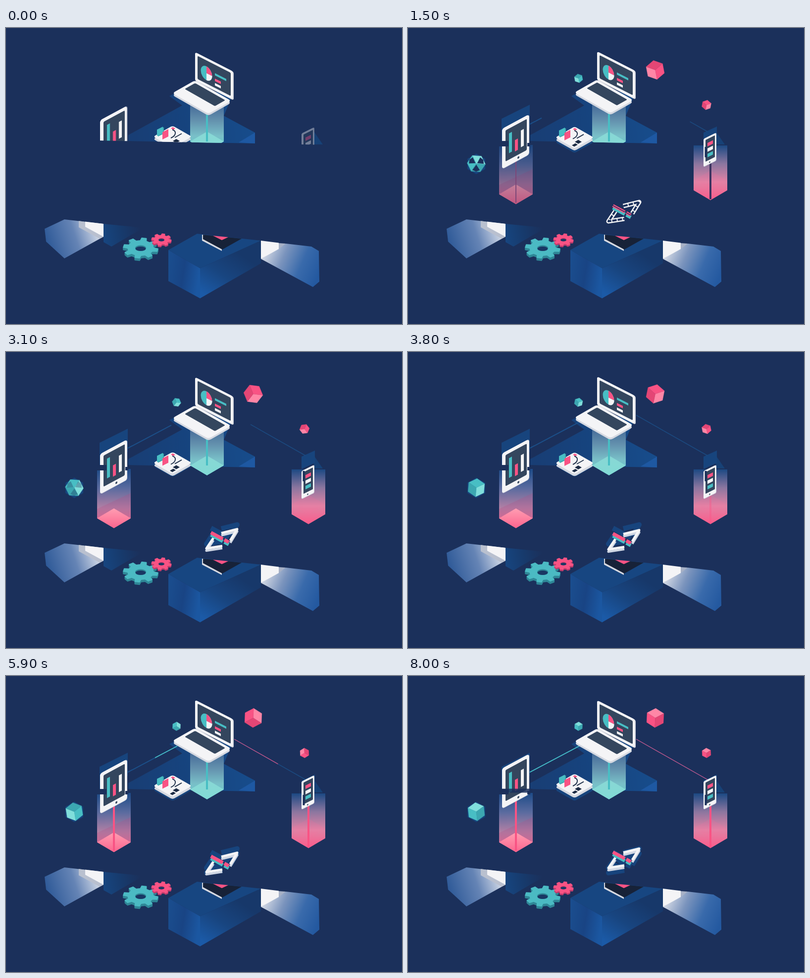
Animation, 800 px wide and 600 px high, one loop 8.1 s. Source, as an HTML page:

```html
<!DOCTYPE html>
<html lang="en">
<head>
<meta charset="utf-8">
<title>Isometric devices</title>
<style>
html, body { margin: 0; width: 100%; height: 100%; overflow: hidden; background: #1b305b; }
svg { display: block; width: 100%; height: 100%; }
</style>
</head>
<body>
<svg id="stage" viewBox="0 0 800 600" xmlns="http://www.w3.org/2000/svg"></svg>
<script>
const LOOP = 8100, STEP = 100;
const BG = '#1b305b', GHOST = '#17447d', WHITE = '#f4f4f6', EDGE = '#d6d9e1', SCREEN = '#34465e';
const PINK = '#f95384', TEAL = '#48bec4';

// markup helpers
const poly = (points, fill, more = '') => `<polygon points="${points}" fill="${fill}" ${more}/>`;
const rect = (x, y, w, h, fill, more = '') =>
  `<rect x="${x}" y="${y}" width="${w}" height="${h}" fill="${fill}" ${more}/>`;
const round = (w, h, r, fill, inset = 0) => rect(inset, inset, w, h, fill, `rx="${r}"`);
const ellipse = (x, y, rx, ry, fill) => `<ellipse cx="${x}" cy="${y}" rx="${rx}" ry="${ry}" fill="${fill}"/>`;
const path = (d, color, width, more = '') =>
  `<path d="${d}" fill="none" stroke="${color}" stroke-width="${width}" stroke-linejoin="round" ${more}/>`;
const group = (id, body, more = '') => `<g id="${id}" ${more}>${body}</g>`;
const fade = (id, x1, y1, x2, y2, ...colors) =>
  `<linearGradient id="${id}" gradientUnits="userSpaceOnUse" x1="${x1}" y1="${y1}" x2="${x2}" y2="${y2}">` +
  colors.map((c, i) => `<stop offset="${i / (colors.length - 1)}" stop-color="${c}"/>`).join('') +
  '</linearGradient>';

// isometric planes: an upright wall with a slope, and the ground
const wall = (x, y, slope, body) => `<g transform="matrix(1 ${slope} 0 1 ${x} ${y})">${body}</g>`;
const ground = (x, y, body) => `<g transform="matrix(1 .57 -1 .57 ${x} ${y})">${body}</g>`;
const rhomb = (x, y, fill, more) =>
  poly(`${x - 34},${y} ${x},${y - 20} ${x + 34},${y} ${x},${y + 20}`, fill, more);
const column = (x, top, base, fill) =>
  poly(`${x - 34},${top} ${x + 34},${top} ${x + 34},${base} ${x},${base + 20} ${x - 34},${base}`, fill);

const defs = '<defs>' +
  '<clipPath id="upper"><polygon points="0,0 800,0 800,240 0,224.4"/></clipPath>' +
  fade('floor', 260, 220, 500, 200, '#183e75', '#16447f', '#174c8b') +
  fade('leftGlow', 82, 432, 192, 396, '#2f5a98', '#6584b5', '#e8ebf2') +
  fade('leftDark', 197, 420, 272, 408, '#17457f', '#173a6c', BG) +
  fade('boxLeft', 328, 480, 392, 490, '#1a4d8e', '#194484', '#1b57a1') +
  fade('boxRight', 400, 540, 460, 450, '#1b5aa7', '#184580', '#17386a') +
  fade('rightGlow', 522, 452, 632, 500, '#d6dbe6', '#7b94bd', '#396aab', '#2459a0') +
  fade('tealBeam', 0, 155, 0, 250, '#456a98', '#6390ad', '#79bfc8', '#62c9ca') +
  fade('tabletBeam', 0, 236, 0, 357, '#1b4a87', '#5a6b9f', '#b380a5', '#fa668f') +
  fade('phoneBeam', 0, 238, 0, 349, '#1c4983', '#8b769f', '#e083a5', '#fb5b8b') +
  fade('tip', 0, 317, 0, 357, '#ff9db2', '#fb658e') +
  '</defs>';

// flat gear seen at an angle, with a darker rim below
function gear(cx, cy, rx, ry, depth, color, dark) {
  const ring = (dy, tone) => {
    const pts = Array.from({ length: 32 }, (_, i) => {
      const high = i % 4 === 1 || i % 4 === 2, side = i % 4 < 2 ? -1 : 1;
      const a = (Math.floor(i / 4) + side * (high ? .17 : .28)) * Math.PI / 4 + .2;
      const r = high ? .97 : .72;
      return `${(cx + rx * r * Math.cos(a)).toFixed(1)},${(cy + dy + ry * r * Math.sin(a)).toFixed(1)}`;
    });
    return poly(pts.join(' '), tone, `stroke="${tone}" stroke-width="2" stroke-linejoin="round"`);
  };
  let s = '';
  for (let d = depth; d > 0; d--) s += ring(d, dark);
  return s + ring(0, color) + ellipse(cx, cy, rx * .31, ry * .27, dark) +
    ellipse(cx, cy + depth * .3, rx * .29, ry * .22, '#193763');
}

function cube(id, r, tones) {
  const at = deg => {
    const a = deg * Math.PI / 180;
    return `${(r * Math.cos(a)).toFixed(2)},${(r * Math.sin(a)).toFixed(2)}`;
  };
  return group(id, tones.map((tone, i) => {
    const mid = -90 - 120 * i;
    return poly(`0,0 ${at(mid - 60)} ${at(mid)} ${at(mid + 60)}`, tone, `stroke="${tone}" stroke-width=".4"`);
  }).join(''));
}
const pinks = ['#ff86a6', PINK, '#e44675'];
const teals = ['#80dedb', TEAL, '#3ca7b1'];

const floor =
  poly('247,217 356,157 330,138 345,130 460,130 440,178 503,212 503,234 247,229', 'url(#floor)') +
  poly('470,232 503,212 503,234', '#1e58a2') +
  poly('622,210 640,236 622,236', '#174176');

const lower =
  poly('78,407 118,388 197,397 197,423 118,467 81,433', 'url(#leftGlow)') +
  poly('147,391 160,393 160,403 197,423 189,427 147,404', '#b9c0cf') +
  poly('160,392.5 197,397 197,423 160,403', WHITE) +
  poly('197,397 278,405 213,443 197,434', 'url(#leftDark)') +
  poly('328,450 386,417 515,431 392,487', '#174681') +
  poly('328,450 392,487 392,548 328,513', 'url(#boxLeft)') +
  poly('392,487 515,431 515,477 392,548', 'url(#boxRight)') +
  poly('396,419 400,419 436,444 436,452 396,431', EDGE) +
  poly('398,419 476,427 437,449 398,428', '#172238') +
  poly('418,421 449,424 436,430', PINK) +
  poly('515,468 565,437 617,443 632,452 633,514 620,525', 'url(#rightGlow)') +
  poly('551,436 565,437 551,448', '#a7b1c6') +
  poly('515,431 551,435.5 551,448 515,468', WHITE) +
  gear(272, 446, 36, 21, 5, '#4bbac3', '#2f8797') +
  gear(314, 429, 20, 12, 3, PINK, '#bd3c6c');

const laptop =
  ground(382, 110, round(73, 46, 5, EDGE)) +
  ground(382, 106, round(73, 46, 5, WHITE) + round(61, 21, 2, SCREEN, 5)) +
  wall(382, 49, .51,
    round(78, 58, 4, EDGE) + round(76, 57, 4, WHITE) + round(67, 47, 2, SCREEN, 5) +
    ellipse(23, 31, 11.5, 14, TEAL) +
    `<path d="M23 31V17A11.5 14 0 0 1 34.5 31Z" fill="${PINK}"/>` +
    `<path d="M23 31H34.5A11.5 14 0 0 1 23 45Z" fill="${WHITE}"/>` +
    rect(40, 22, 23, 4.5, TEAL) + rect(40, 33, 12, 5, PINK) + rect(40, 42, 12, 5, WHITE));

const tablet = wall(190, 187, -.54,
  round(55, 82, 5, EDGE) + round(54, 81, 5, WHITE) + round(43, 63, 2, SCREEN, 7) +
  rect(14, 17, 6, 40, TEAL) + rect(26, 37, 6, 23, PINK) + rect(38, 24, 6, 34, WHITE) +
  ellipse(33, 76, 2, 2.2, SCREEN));

const phone = wall(597, 214, -.5,
  round(26, 57, 3, EDGE) + round(25, 56, 3, WHITE) + round(19, 44, 1, SCREEN, 4) +
  [PINK, WHITE, TEAL].map((c, i) => rect(8, 12 + 11 * i, 11, 7, c)).join('') +
  ellipse(12.5, 53, 1.3, 1.3, SCREEN));

const card =
  ground(336.5, 203, round(39, 39, 4, EDGE)) +
  ground(336.5, 198, round(39, 39, 4, WHITE)) +
  wall(305, 206, -.5, rect(2, 2, 12, 13, '#3aa5ac') + rect(0, 0, 12, 13, TEAL)) +
  wall(316, 211, -.5, rect(0, 0, 12, 15, PINK)) +
  ground(337, 201, rect(0, 0, 5, 4, PINK)) +
  path('M336 206C345 209 344 218 333 223M341 222L355 214', '#26364f', 2) +
  ground(344, 225, rect(0, 0, 7, 7, '#1c2b44')) +
  ground(338, 232, rect(0, 0, 5, 7, '#1c2b44'));

const laptopBeam = column(406, 150, 230, 'url(#tealBeam)') + rhomb(406, 230, '#8de0da', 'opacity=".75"');
const tabletBeam = column(218, 237, 337, 'url(#tabletBeam)') +
  poly('184,318 252,286 252,337 184,337', '#b04d83', 'opacity=".25"') + rhomb(218, 337, 'url(#tip)');
const phoneBeam = column(611, 238, 329, 'url(#phoneBeam)') + rhomb(611, 309, '#ff6f9a', 'opacity=".15"');

const chevrons = 'M419 368L405 389L437 384M435 358L467 350L453 373';
const slash = 'M414 357L438 370M441 371.5L450 376.5';
const drop = 'transform="translate(0 4.5)"';
const silhouette = (id, dy) => group(id, path(chevrons + slash, GHOST, 10, `transform="translate(0 ${dy})"`));
const icon =
  group('iconFill', path(chevrons, '#cfd6e3', 5, drop) + path(chevrons, WHITE, 5) +
    path(slash, TEAL, 7, drop) + path(slash, PINK, 7)) +
  group('iconEdge', path(chevrons, WHITE, 9) + path(chevrons, BG, 4, 'stroke-dasharray="9 2"') +
    path(slash, TEAL, 7, drop) + path(slash, PINK, 6) + path(slash, BG, 1.5));

function wedge(a) {
  const p = (r, d) => `${(r * Math.cos(a + d)).toFixed(1)},${(r * Math.sin(a + d)).toFixed(1)}`;
  return poly(`${p(2, 0)} ${p(15, -.52)} ${p(16, 0)} ${p(15, .52)}`, BG);
}
const line = (id, color, w) => `<line id="${id}" stroke="${color}" stroke-width="${w}"/>`;

document.getElementById('stage').innerHTML = defs + rect(0, 0, 800, 600, BG) + floor + lower +
  group('trails',
    wall(189, 184, -.5, rect(0, 0, 57, 47, GHOST)) +
    wall(597, 212, -.45, rect(0, 0, 27, 25, GHOST)) +
    ground(336.5, 209, round(39, 39, 4, GHOST))) +
  line('leftTrack', '#1b4f89', 2) + line('rightTrack', '#1b4a80', 1.5) +
  line('leftLine', TEAL, 1.8) + line('rightLine', '#cc5285', 1.3) +
  group('base', rhomb(406, 230, '#c2cad2')) +
  group('laptopBeam', laptopBeam) + group('tabletBeam', tabletBeam) + group('phoneBeam', phoneBeam) +
  rect(404, 165, 4, 65, TEAL) +
  group('darkStem', rect(609, 260, 4, 87, '#3d3360') + rect(217, 265, 2, 89, '#7d4778')) +
  rect(216, 245, 4, 109, PINK, 'id="tabletStem"') + rect(609, 250, 4, 97, PINK, 'id="phoneStem"') +
  group('tabletClip', group('tablet', tablet)) + group('phoneClip', group('phone', phone)) +
  group('cuts', rect(183, 229, 20, 11, BG) + rect(241, 233, 6, 7, BG) + rect(599.5, 241, 4, 21, BG)) +
  rect(183, 228.5, 68, 8, BG, 'id="band"') +
  group('cardClip', group('card', card)) + group('laptop', laptop) +
  silhouette('iconHigh', 0) + silhouette('iconLow', 10) + group('icon', icon) +
  group('cubes',
    cube('pinkBig', 19.5, pinks) + cube('pinkSmall', 10, pinks) + cube('tealSmall', 9, teals) +
    cube('halo', 20.5, [GHOST, GHOST, GHOST]) + cube('tealBig', 18.5, teals) +
    group('wedges', [0, 1, 2].map(i => wedge(-.5 + i * Math.PI * 2 / 3)).join('')));

const el = {};
document.querySelectorAll('#stage [id]').forEach(n => el[n.id] = n);

// motion helpers
const ramp = (t, a, b) => Math.min(1, Math.max(0, (t - a) / (b - a)));
const smooth = x => Math.sin(x * Math.PI / 2) ** 2;
const hump = (t, peak, end) => smooth(ramp(t, 0, peak)) * (1 - smooth(ramp(t, peak, end)));

const move = (id, x, y, turn = 0) =>
  el[id].setAttribute('transform', `translate(${x} ${y.toFixed(2)}) rotate(${turn.toFixed(2)})`);
const alpha = (id, a) => el[id].setAttribute('opacity', Number(a));
const clip = (id, on) => el[id].setAttribute('clip-path', on ? 'url(#upper)' : 'none');

function stretch(id, [x1, y1], [x2, y2], part) {
  const ends = { x1, y1, x2: x1 + (x2 - x1) * part, y2: y1 + (y2 - y1) * part };
  for (const k in ends) el[id].setAttribute(k, ends[k]);
  alpha(id, part > 0);
}
const leftPort = [346, 142], tabletPort = [246, 195], rightPort = [461, 128], phonePort = [605, 210];

function draw(t) {
  const u = t / LOOP, first = t < STEP, solid = t >= 1900;

  move('tablet', 0, 20 * Math.sin(Math.PI * u ** .65));
  move('phone', 0, 28.5 * hump(t, 3500, 6000));
  move('laptop', 0, -2 * Math.sin(4 * Math.PI * u));
  move('card', 0, 5 * hump(t, 3800, LOOP));
  move('icon', 0, 12 * hump(t, 4600, LOOP));

  const spin = 360 * u ** .6;
  move('pinkBig', 499.5, 85, -spin);
  move('pinkSmall', 603, 156, spin);
  move('tealSmall', 344.5, 102, -spin);
  move('halo', 138, 275.5);
  move('tealBig', 138, 275, 360 * u ** 1.4);
  move('wedges', 138, 275);
  alpha('wedges', 1 - ramp(t, 2500, 3400));

  // only the upper part is present at the start of the loop
  ['tabletClip', 'phoneClip', 'cardClip'].forEach(id => clip(id, first));
  clip('laptopBeam', t < 2900);
  ['trails', 'icon', 'cubes', 'cuts'].forEach(id => alpha(id, !first));
  alpha('phoneClip', first ? .4 : 1);
  alpha('band', t >= 7300 ? .85 : 0);

  const dip = ramp(t, 4500, 5000) * (1 - ramp(t, 5300, 5900));
  alpha('laptopBeam', 1 - dip);
  alpha('base', dip > 0);
  alpha('tabletBeam', ramp(t, 100, 2000));
  alpha('phoneBeam', ramp(t, 100, 1300));
  alpha('darkStem', first ? 0 : 1 - ramp(t, 1500, 2300));
  alpha('tabletStem', ramp(t, 3900, 4900));
  alpha('phoneStem', ramp(t, 3300, 4600));

  stretch('leftTrack', tabletPort, leftPort, ramp(t, 900, 3400));
  stretch('rightTrack', phonePort, rightPort, ramp(t, 750, 3800));
  stretch('leftLine', leftPort, tabletPort, ramp(t, 4840, 7200));
  stretch('rightLine', rightPort, phonePort, ramp(t, 3830, 7200));

  alpha('iconFill', solid);
  alpha('iconEdge', !solid);
  alpha('iconHigh', solid);
  alpha('iconLow', t >= 5200);
}

function tick(now) {
  draw(Math.floor((now % LOOP) / STEP) * STEP);
  requestAnimationFrame(tick);
}
draw(0);
requestAnimationFrame(tick);
</script>
</body>
</html>
```
